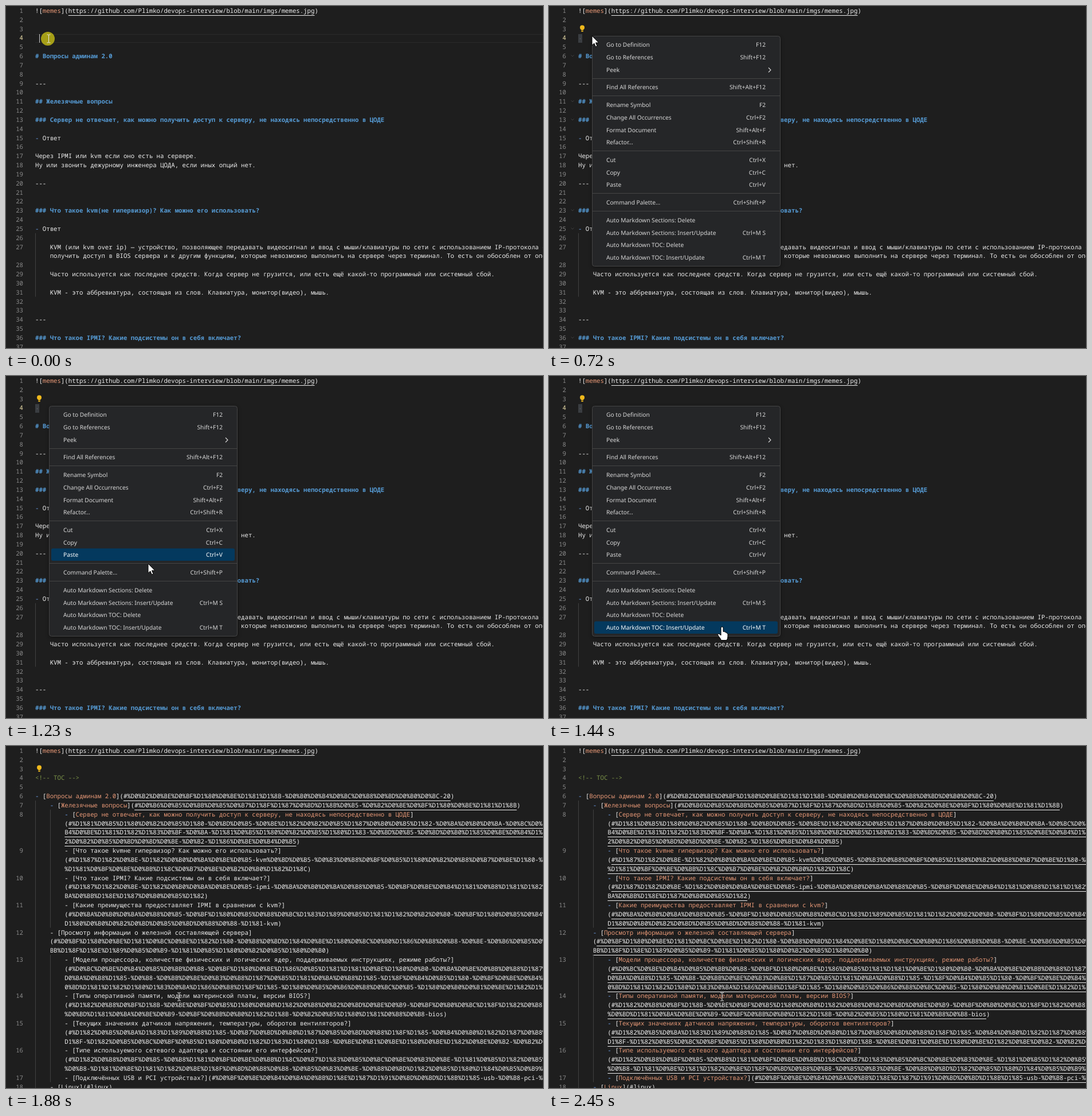
These frames come from a looping animation (937 px wide and 596 px high, 2.95 s). An HTML page:

```html
<!DOCTYPE html>
<html lang="ru">
<head>
<meta charset="utf-8">
<title>Markdown TOC</title>
<style>
html, body { margin: 0; width: 100%; height: 100%; overflow: hidden; background: #1e1e1e; }
svg { display: block; width: 100%; height: 100%; }
text { white-space: pre; fill: #f0f0f0; font: 500 10.69px "Noto Sans Mono", monospace; text-rendering: geometricPrecision; }
.head { fill: #569cd6; font-weight: 700; }
.mark { fill: #6fa4f0; }
.link { fill: #ea9a78; }
.note { fill: #7c9448; }
.num { fill: #8a8a8a; font-weight: 400; text-anchor: end; }
.active { fill: #f0e2ac; }
.line { fill: #ececec; }
.guide { fill: #404040; }
.plain text { fill: #f0f0f0; }
.plain .line { display: none; }
.plain .num { fill: #8a8a8a; }
#menu text { font: 10.2px "Noto Sans", "Open Sans", sans-serif; fill: #d8d8d8; }
#menu .key { text-anchor: end; }
#menu text.on { fill: #fff; }
#panel { filter: drop-shadow(0 2px 3px rgba(0, 0, 0, .4)); }
</style>
</head>
<body>
<svg id="stage" viewBox="0 0 937 596"></svg>
<script>
const LOOP = 2950, CW = 6.4143, LH = 15.833, LEFT = 51, COLS = 212;
const stage = document.getElementById('stage');

function add(parent, tag, attrs = {}, content) {
  const el = document.createElementNS('http://www.w3.org/2000/svg', tag);
  for (const k in attrs) el.setAttribute(k, attrs[k]);
  if (content !== undefined) el.textContent = content;
  parent.appendChild(el);
  return el;
}
const group = (parent = stage, attrs) => add(parent, 'g', attrs);
const rect = (g, x, y, width, height, attrs) => add(g, 'rect', { x, y, width, height, ...attrs });
const show = (el, on) => el.setAttribute('visibility', on ? 'inherit' : 'hidden');
const base = row => Math.round(12 + LH * row);

// Places [text, class] runs one after another on the character grid.
function write(g, row, col, ...runs) {
  for (const [s, cls = ''] of runs) {
    const x = LEFT + col * CW;
    if (cls === 'url') rect(g, x, base(row) + 4, s.length * CW, 1, { class: 'line' });
    add(g, 'text', { x, y: base(row), class: cls }, s);
    col += s.length;
  }
}
const number = (g, row, n, cls = '') =>
  add(g, 'text', { x: 30, y: base(row), class: 'num ' + cls }, n);
const guide = (g, col, from, to) =>
  rect(g, Math.round(LEFT + col * CW), LH * from, 1, LH * (to - from), { class: 'guide' });

// Shared first rows
const intro = group();
for (let n = 1; n < 4; n++) number(intro, n - 1, n);
write(intro, 0, 0, ['!['], ['memes', 'link'], [']('],
  ['https://github.com/Plimko/devops-interview/blob/main/imgs/memes.jpg', 'url'], [')']);

// Document before the table of contents
const before = group();
const current = group(before);
for (const y of [49, 63]) rect(current, LEFT, y, 886, 1, { fill: '#2a2a2a' });
guide(before, 0, 25, 32);
for (let n = 4; n < 38; n++) number(before, n < 28 ? n - 1 : n, n, n === 4 ? 'active' : '');
const rows = {
  5: '# Вопросы админам 2.0',
  8: '---',
  10: '## Железячные вопросы',
  12: '### Сервер не отвечает, как можно получить доступ к серверу, не находясь непосредственно в ЦОДЕ',
  14: '- Ответ',
  16: 'Через IPMI или kvm если оно есть на сервере.',
  17: 'Ну или звонить дежурному инженера ЦОДА, если иных опций нет.',
  19: '---',
  22: '### Что такое kvm(не гипервизор)? Как можно его использовать?',
  24: '- Ответ',
  26: '    KVM (или kvm over ip) — устройство, позволяющее передавать видеосигнал и ввод с мыши/клавиатуры по сети с использованием IP-протокола с',
  27: '    получить доступ в BIOS сервера и к другим функциям, которые невозможно выполнить на сервере через терминал. То есть он обособлен от операционной',
  29: '    Часто используется как последнее средств. Когда сервер не грузится, или есть ещё какой-то программный или системный сбой.',
  31: '    KVM - это аббревиатура, состоящая из слов. Клавиатура, монитор(видео), мышь.',
  34: '---',
  36: '### Что такое IPMI? Какие подсистемы он в себя включает?'
};
for (const row in rows) {
  const s = rows[row];
  if (s[0] === '#') write(before, row, 0, [s, 'head']);
  else if (s.startsWith('- ')) write(before, row, 0, ['- ', 'mark'], [s.slice(2)]);
  else write(before, row, s.search(/\S/), [s.trim()]);
}

const folds = group(before, { fill: 'none', stroke: '#c5c5c5' });
for (const row of [5, 10, 12, 22, 24, 36])
  add(folds, 'path', { d: `M38.5 ${base(row) - 5.5}l2.5 2.5 2.5-2.5` });

const pick = rect(before, LEFT, 49, 7, 15);
const dot = add(before, 'circle', { cx: 54.5, cy: 57, r: .8, fill: '#6a6a6a' });
const caret = rect(before, 58, 49, 1, 15, { fill: '#c8c8c8' });

// Document with the table of contents
const after = group();
const late = group(after);
const slug = s => '#' + encodeURIComponent(
  s.toLowerCase().replace(/[^\p{L}\d -]/gu, '').replace(/ /g, '-'));
guide(after, 0, 6, 38);
guide(after, 4, 7, 20);
guide(after, 4, 23, 37);
number(after, 3, 4);
number(after, 4, 5);
write(after, 3, 0, ['<!-- TOC -->', 'note']);

const toc = [
  [0, 'Вопросы админам 2.0'],
  [4, 'Железячные вопросы'],
  [8, 'Сервер не отвечает, как можно получить доступ к серверу, не находясь непосредственно в ЦОДЕ'],
  [8, 'Что такое kvmне гипервизор? Как можно его использовать?'],
  [8, 'Что такое IPMI? Какие подсистемы он в себя включает?'],
  [8, 'Какие преимущества предоставляет IPMI в сравнении с kvm?'],
  [4, 'Просмотр информации о железной составляющей сервера'],
  [8, 'Модели процессора, количестве физических и логических ядер, поддерживаемых инструкциях, режиме работы?'],
  [8, 'Типы оперативной памяти, модели материнской платы, версии BIOS?'],
  [8, 'Текущих значениях датчиков напряжения, температуры, оборотов вентиляторов?'],
  [8, 'Типе используемого сетевого адаптера и состоянии его интерфейсов?'],
  [8, 'Подключённых USB и PCI устройствах?'],
  [4, 'Linux']
];
let next = 5;
toc.forEach(([col, title], k) => {
  const g = k < 3 ? after : late, url = slug(title), width = COLS - col;
  const label = [['- ', 'mark'], ['['], [title, 'link'], [']']];
  number(g, next, k + 6);
  if (title.length + url.length + 6 <= width) {
    write(g, next++, col, ...label, ['('], [url, 'url'], [')']);
    return;
  }
  write(g, next++, col, ...label);
  write(g, next++, col, ['('], [url.slice(0, width - 1), 'url']);
  for (let p = width - 1; p < url.length; p += width) {
    const part = url.slice(p, p + width), end = p + width >= url.length;
    write(g, next++, col, [part, 'url'], [end ? ')' : '']);
  }
});

const bulb = group(stage, { fill: '#f0b91c' });
add(bulb, 'circle', { cx: 58, cy: 37.4, r: 4 });
rect(bulb, 56.2, 40, 3.6, 4.8, { rx: .8 });
rect(bulb, 56.2, 42, 3.6, .8, { fill: '#1e1e1e' });

// Context menu; an empty string is a separator
const menu = group(stage, { id: 'menu' });
rect(menu, 75.5, 52.5, 328, 401, { rx: 4, fill: '#252628', stroke: '#454545', id: 'panel' });
const bar = rect(menu, 79, 0, 320, 21.5, { rx: 3, fill: '#04395e' });
const items = [];
let itemY = 67.2;
for (const entry of [
  'Go to Definition|F12', 'Go to References|Shift+F12', 'Peek', '',
  'Find All References|Shift+Alt+F12', '',
  'Rename Symbol|F2', 'Change All Occurrences|Ctrl+F2', 'Format Document|Shift+Alt+F',
  'Refactor...|Ctrl+Shift+R', '',
  'Cut|Ctrl+X', 'Copy|Ctrl+C', 'Paste|Ctrl+V', '',
  'Command Palette...|Ctrl+Shift+P', '',
  'Auto Markdown Sections: Delete', 'Auto Markdown Sections: Insert/Update|Ctrl+M S',
  'Auto Markdown TOC: Delete', 'Auto Markdown TOC: Insert/Update|Ctrl+M T'
]) {
  if (!entry) {
    rect(menu, 76, Math.round(itemY - 6.6), 327, 1, { fill: '#454545' });
    itemY += 9.17;
    continue;
  }
  const [name, key = ''] = entry.split('|'), y = Math.round(itemY) + 4;
  items.push({
    y: itemY,
    texts: [add(menu, 'text', { x: 100, y }, name), add(menu, 'text', { x: 378, y, class: 'key' }, key)]
  });
  if (name === 'Peek')
    add(menu, 'path', { d: `M383 ${y - 7.5}l4 4-4 4`, fill: 'none', stroke: '#d8d8d8', 'stroke-width': 1.1 });
  itemY += 21.67;
}

// Mouse pointer
const halo = add(stage, 'circle', { r: 12, fill: '#e6dc14', opacity: .68 });
const mouse = group();
const solid = { fill: '#fff', stroke: '#000', 'stroke-width': 1, 'stroke-linejoin': 'round' };
const shapes = {
  beam: add(mouse, 'path', { d: 'M-3-7h2.5l.5.5.5-.5H3M0-6.5v13M-3 7h2.5l.5-.5.5.5H3', fill: 'none', stroke: '#e6e6e6' }),
  arrow: add(mouse, 'path', { d: 'M0 0V16.5L3.8 13 6.4 19 9 17.9 6.5 12H11.8Z', ...solid }),
  hand: add(mouse, 'path', {
    d: 'M-2 2Q-2 0 0 0T2 2V8.5Q4.5 7.5 5.2 9.6 7.6 9 8 11 10 11 10 13V17Q10 20.5 8 23.5H-1.5Q-2.5 20.5-6 16.5-8.5 13-6.5 12.2-5 11.8-2 15Z',
    ...solid
  })
};

// time, x, y, pointer, highlighted item
const steps = [
  [0, 74.5, 57, 'beam'], [80, 50, 55, 'beam'], [150, 33, 49, 'arrow'],
  [360, 42, 54, 'arrow'], [450, 46, 54, 'arrow'], [520, 58, 53, 'beam'], [590, 68, 52, 'beam'],
  [660, 75, 52, 'arrow'], [730, 80, 59, 'arrow'], [800, 92, 79, 'hand', 0], [870, 114, 107, 'hand', 1],
  [940, 138, 132, 'hand', 2], [1010, 166, 181, 'hand', 4], [1080, 194, 233, 'hand', 6],
  [1150, 223, 284, 'hand', 8], [1230, 248, 327, 'arrow', 10], [1310, 270, 368, 'hand', 11],
  [1380, 290, 411, 'hand', 13], [1440, 302, 437, 'hand', 15], [1810, 302, 437, 'beam']
];

function draw(t) {
  const within = (a, b) => t >= a && t < b;
  const [at, x, y, shape, item = -1] = steps.findLast(s => s[0] <= t);
  const open = within(660, 1810), focus = !open;

  show(before, t < 1880);
  show(after, t >= 1880);
  late.setAttribute('class', t < 1950 ? 'plain' : '');
  show(current, t < 80);
  for (const el of [pick, dot]) show(el, within(80, 1880));
  pick.setAttribute('fill', focus ? '#264f78' : '#3a3d41');
  show(caret, focus && t < 1880);
  caret.setAttribute('x', t < 80 ? 58 : LEFT);
  folds.setAttribute('opacity', within(360, 730) ? .08 + .2 * Math.sin((at - 360) / 370 * Math.PI) : 0);
  show(bulb, within(360, 2450));

  show(menu, open);
  show(bar, open && item >= 0);
  if (item >= 0) bar.setAttribute('y', Math.round(items[item].y) - 10.5);
  items.forEach((it, k) => it.texts.forEach(el => el.classList.toggle('on', k === item)));

  show(halo, t < 360 || within(1740, 1810));
  halo.setAttribute('cx', shape === 'beam' ? x - 1.5 : x);
  halo.setAttribute('cy', y);
  mouse.setAttribute('transform', `translate(${x} ${y})`);
  for (const k in shapes) show(shapes[k], k === shape);
}

const start = performance.now();
function tick() {
  draw((performance.now() - start) % LOOP);
  requestAnimationFrame(tick);
}
tick();
</script>
</body>
</html>
```
